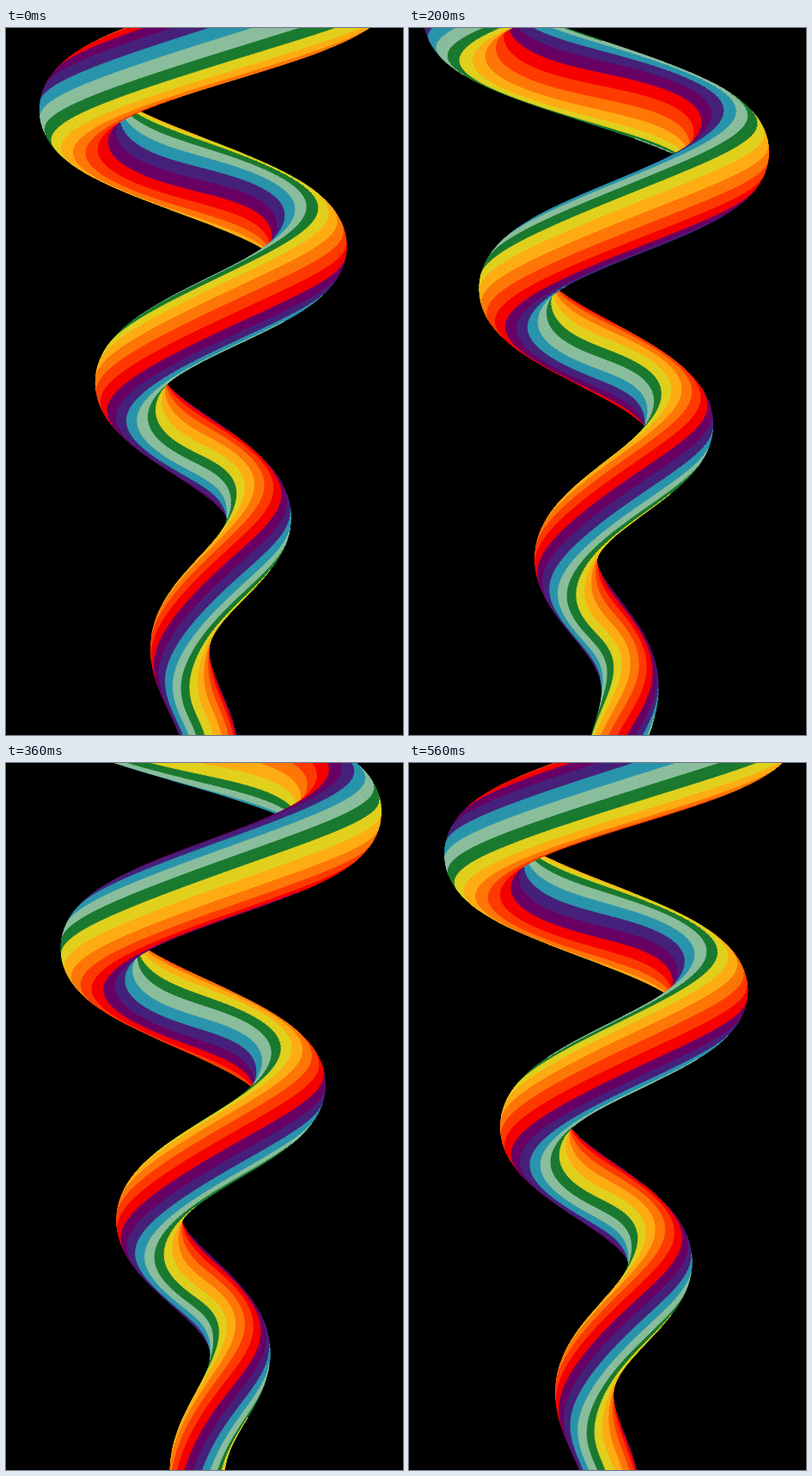
These frames come from a looping animation (462x821 px, 0.58 s). An HTML page with a canvas:

```html
<!DOCTYPE html>
<html lang="en">
<head>
<meta charset="utf-8">
<title>Rainbow helix</title>
<style>
  html, body { margin: 0; width: 100%; height: 100%; overflow: hidden; background: #000; }
  canvas { display: block; }
</style>
</head>
<body>
<canvas id="stage" width="462" height="821"></canvas>
<script>
const ctx = document.getElementById('stage').getContext('2d');
const W = 462, H = 821, LOOP = 580, TICK = 20;
const COLORS = ['#1a7a2f', '#e2d11c', '#ffad13', '#ff7707', '#ff3a00',
                '#f60000', '#690065', '#46217b', '#2995ad', '#8abe9c'];
const STRIPES = 20, SPLIT = 3, SIDES = STRIPES * SPLIT;
const AXIS = 234, PITCH = 319, LEFT_Y = 98.5, STEP = 4;
const TURN = 2 * Math.PI, W_Y = TURN / PITCH, RISE = PITCH / TURN;
const TAPER = 0.183;

const coilRadius = y => 165.3 - TAPER * y;
const tubeRadius = y => 49.2 - 0.0215 * y;

// One cross-section of the tube: its rim in screen space and its normals' depth
function ring(y, phase) {
  const R = coilRadius(y), r = tubeRadius(y);
  const a = Math.PI + W_Y * (y - LEFT_Y) + TURN * phase;
  const c = Math.cos(a), s = Math.sin(a);

  let tx = -R * W_Y * s - TAPER * c, ty = 1, tz = R * W_Y * c - TAPER * s;
  const tl = Math.hypot(tx, ty, tz);
  tx /= tl; ty /= tl; tz /= tl;

  // outward normal, made perpendicular to the tangent
  const d = c * tx + s * tz;
  let nx = c - d * tx, ny = -d * ty, nz = s - d * tz;
  const nl = Math.hypot(nx, ny, nz);
  nx /= nl; ny /= nl; nz /= nl;

  // downward binormal
  const bx = ty * nz - tz * ny, by = tz * nx - tx * nz, bz = tx * ny - ty * nx;

  // stripe number facing outward: twist along the coil, spin in time,
  // and a faster twist on the far half of each turn
  const facing = -2.58 + 11.3 * Math.asinh(R / RISE) - 10 * phase - c * (0.45 - 0.8 * s);

  const xs = [], ys = [], depth = [];
  for (let i = 0; i <= SIDES; i++) {
    const f = (i / SPLIT - 0.5 - facing) * TURN / STRIPES;
    const u = Math.cos(f), v = Math.sin(f);
    xs.push(AXIS + R * c + r * (nx * u + bx * v));
    ys.push(y + r * (ny * u + by * v));
    depth.push(nz * u + bz * v);
  }
  return { xs, ys, depth, z: R * s };
}

function drawBand(p, q) {
  for (let i = 0; i < SIDES; i++) {
    const j = i + 1;
    if (p.depth[i] + p.depth[j] + q.depth[i] + q.depth[j] <= 0) continue;
    ctx.fillStyle = ctx.strokeStyle = COLORS[Math.floor(i / SPLIT) % COLORS.length];
    ctx.beginPath();
    ctx.moveTo(p.xs[i], p.ys[i]);
    ctx.lineTo(p.xs[j], p.ys[j]);
    ctx.lineTo(q.xs[j], q.ys[j]);
    ctx.lineTo(q.xs[i], q.ys[i]);
    ctx.closePath();
    ctx.fill();
    ctx.stroke();
  }
}

function draw(phase) {
  ctx.fillStyle = '#000';
  ctx.fillRect(0, 0, W, H);
  ctx.lineWidth = 1;
  ctx.lineJoin = 'round';

  const bands = [];
  let last = ring(-140, phase);
  for (let y = -140 + STEP; y <= 884; y += STEP) {
    const next = ring(y, phase);
    bands.push({ p: last, q: next, z: last.z + next.z });
    last = next;
  }
  bands.sort((m, n) => m.z - n.z);
  for (const b of bands) drawBand(b.p, b.q);
}

const start = performance.now();
let shown = -1;
function frame() {
  const ms = (performance.now() - start) % LOOP;
  const tick = Math.floor(ms / TICK);
  if (tick !== shown) {
    shown = tick;
    draw(tick * TICK / LOOP);
  }
  requestAnimationFrame(frame);
}
frame();
</script>
</body>
</html>
```
